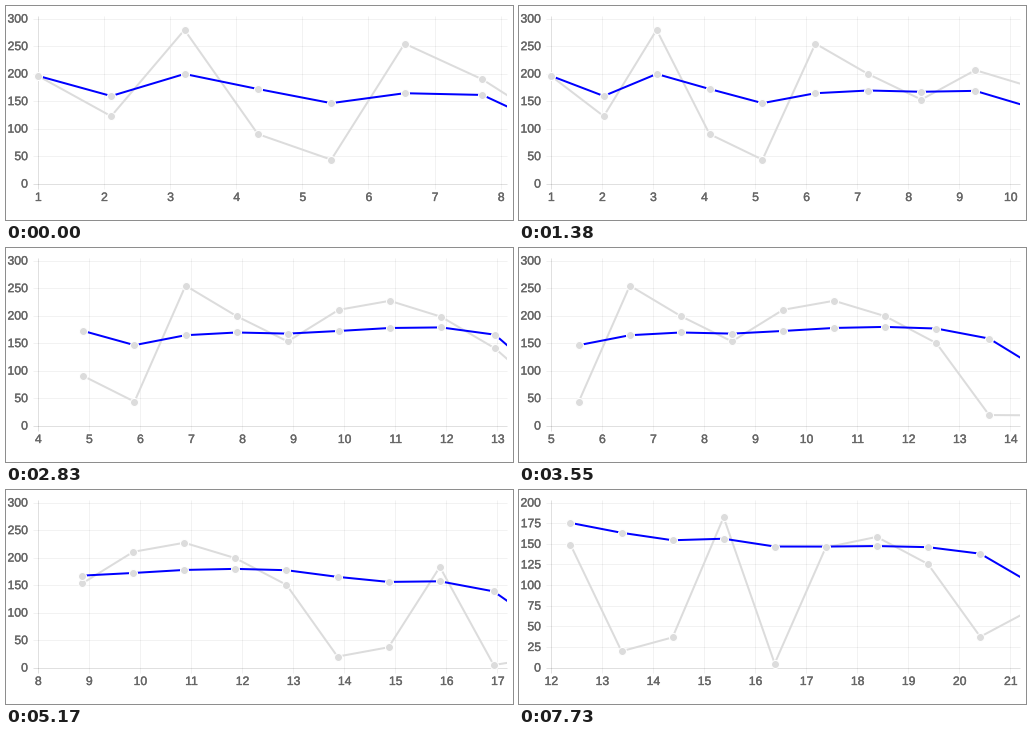
Animation, 507 px wide and 214 px high, one loop 7770 ms. Source, as a matplotlib script:

```python
import numpy as np
import matplotlib.pyplot as plt
from matplotlib import patheffects
from matplotlib.animation import FuncAnimation
from matplotlib.patches import Rectangle

W, H, DPI = 507, 214, 100
PX = 72 / DPI
LOOP, FRAMES = 7770, 259
INTERVAL = LOOP // FRAMES
LEFT, TOP, BOTTOM, EDGE = 31.8, 12.6, 177.6, 501
WINDOW = 10
ARRIVAL_8, PERIOD = -155, 583    # ms: eighth sample, then one per period
DURATION = 1250                  # longer than a period, so moves overlap
GREY, BLUE, INK = "#dcdcdc", "#0000ff", "#666666"

values = np.array([196, 122.5, 279.5, 90, 43.5, 254.5, 199, 153, 210.5, 227,
                   199, 150.5, 20, 37, 184, 5, 147, 160, 127, 38.5, 124])
means = np.cumsum(values) / np.arange(1, len(values) + 1)


def ease_out_quart(u):
    return 1 - (1 - np.clip(u, 0, 1)) ** 4


def arrival(count):
    return ARRIVAL_8 + (count - 8) * PERIOD


def visible(count):
    return slice(max(0, count - WINDOW), count)


def y_max(count):
    return 300 if values[visible(count)].max() > 200 else 200


def to_y(v, vmax):
    return BOTTOM - v * (BOTTOM - TOP) / vmax


def layout(count):
    """Rest positions (x, y value, y mean) of the visible samples."""
    ids, vmax = visible(count), y_max(count)
    # the last label needs half its width plus padding
    right = EDGE - 2.9 - 3.4 * len(str(count))
    x = np.linspace(LEFT, right, min(count, WINDOW))
    return np.column_stack([x, to_y(values[ids], vmax), to_y(means[ids], vmax)])


def build_moves():
    """For each sample count: where the points start and where they go."""
    moves = {6: (layout(6), layout(6))}
    for count in range(7, len(values) + 1):
        begin, goal = moves[count - 1]
        now = begin + (goal - begin) * ease_out_quart(PERIOD / DURATION)
        gap = goal[1, 0] - goal[0, 0]
        fresh = [goal[-1, 0] + 2 * gap, BOTTOM, BOTTOM]
        moves[count] = np.vstack([now, fresh])[-WINDOW:], layout(count)
    return moves


moves = build_moves()

fig = plt.figure(figsize=(W / DPI, H / DPI), dpi=DPI, facecolor="white")
ax = fig.add_axes([0, 0, 1, 1])
ax.set(xlim=(0, W), ylim=(H, 0))
ax.axis("off")
ax.set_autoscale_on(False)
clip = Rectangle((0, 0), EDGE, H, transform=ax.transData)
heavier = [patheffects.withStroke(linewidth=0.35 * PX, foreground=INK)]


def rule(xs, ys, strong):
    ax.plot(xs, ys, color="black", alpha=0.12 if strong else 0.05,
            lw=PX, solid_capstyle="butt", zorder=1)


def label(x, y, text, ha):
    ax.text(x, y, text, ha=ha, va="baseline", color=INK,
            family="Liberation Sans", size=12.2 * PX, zorder=2,
            path_effects=heavier)


def series(x, y, color, z):
    line, = ax.plot(x, y, color=color, lw=2 * PX, solid_joinstyle="miter",
                    solid_capstyle="butt", zorder=z)
    dots, = ax.plot(x, y, "o", ms=8 * PX, mfc=GREY, mec="white", mew=PX,
                    zorder=z + 1)
    for artist in (line, dots):
        artist.set_clip_path(clip)


def draw(i):
    for artist in list(ax.lines) + list(ax.texts):
        artist.remove()
    t = i * INTERVAL
    count = min(8 + (t - ARRIVAL_8) // PERIOD, len(values))
    begin, goal = moves[count]

    first = visible(count).start + 1
    for n, x in enumerate(goal[:, 0]):
        rule([x, x], [9.5, 183], n == 0)
        label(x + 0.5, 195, str(first + n), "center")

    vmax = y_max(count)
    for v in range(0, vmax + 1, 50 if vmax == 300 else 25):
        y = to_y(v, vmax)
        rule([27, EDGE], [y, y], v == 0)
        label(22, y + 4, str(v), "right")

    now = begin + (goal - begin) * ease_out_quart((t - arrival(count)) / DURATION)
    series(now[:, 0], now[:, 1], GREY, 3)
    series(now[:, 0], now[:, 2], BLUE, 5)
    return list(ax.lines) + list(ax.texts)


anim = FuncAnimation(fig, draw, frames=FRAMES, interval=INTERVAL,
                     repeat=True, repeat_delay=0, blit=False)
plt.show()
```
